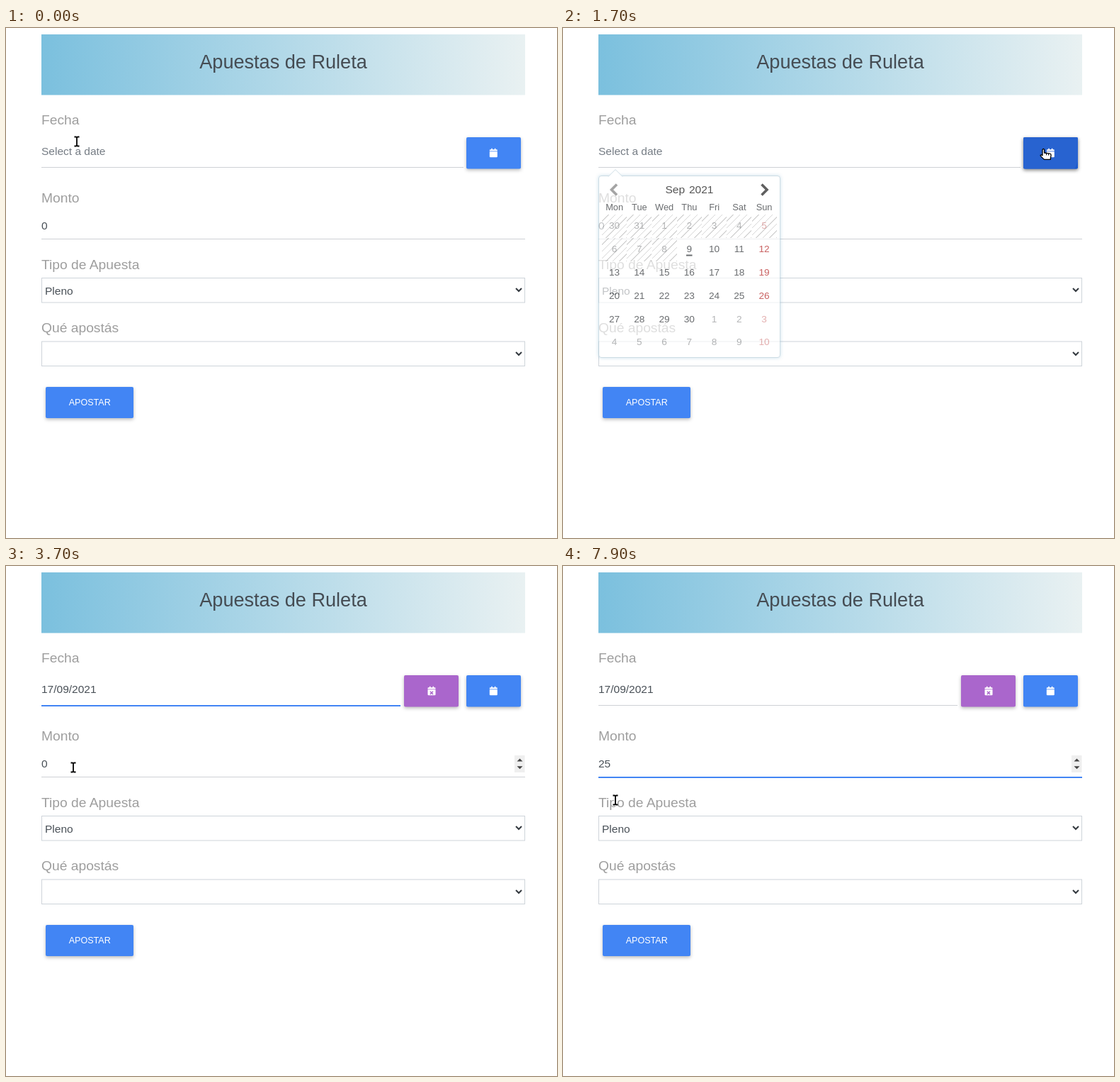
An HTML page that plays this animation: 778x719 px, repeating every 8000 ms.

```html
<!DOCTYPE html>
<html lang="es">
<head>
<meta charset="utf-8">
<title>Apuestas de Ruleta</title>
<style>
  html, body { margin: 0; width: 100%; height: 100%; overflow: hidden; background: #fff; }
  body { position: relative; font-family: "Liberation Sans", Arial, sans-serif; }
  svg { position: absolute; left: 0; top: 0; width: 778px; height: 719px; }
  .title { font-size: 27.1px; fill: #454c53; text-anchor: middle; }
  .label { font-size: 19.25px; fill: #9e9e9e; }
  .field { font-size: 15.5px; fill: #495057; }
  .hint { fill: #757c84; }
  .button { filter: drop-shadow(0 2px 2.5px rgba(0,0,0,.27)); }
  .chevron { fill: none; stroke: #343a40; stroke-width: 2; }
  .option { font: bold 13.2px "Noto Sans", sans-serif; fill: #333; }
  #list rect { filter: drop-shadow(0 1px 2px rgba(0,0,0,.35)); }
  #calendar { position: absolute; left: 50px; top: 208px; width: 255px; height: 255px;
    background: #fff; border: 1px solid #b4ccd8; border-radius: 4px;
    box-shadow: 0 0 5px rgba(100,165,200,.5); color: #212529; }
  #calendar svg { left: -51px; top: -209px; }
  #calendar div { position: absolute; width: 35.2px; height: 32.8px;
    font-size: 13.6px; line-height: 32.8px; text-align: center; }
  #calendar .weekday { font-size: 12.8px; }
  #calendar .sunday { color: #b01515; }
  #calendar .past { background: repeating-linear-gradient(-45deg, #c4c4c4 0 1px, transparent 1px 6.8px); }
  #calendar .past span, #calendar .other span { opacity: .5; }
  #calendar .hover { background: #ddd; }
  .month { font-size: 15.5px; fill: #000; }
  .arrow { fill: none; stroke-width: 3.6; }
</style>
</head>
<body>
<svg id="page">
  <defs>
    <linearGradient id="sky"><stop stop-color="#7bc0de"/><stop offset="1" stop-color="#e9f1f2"/></linearGradient>
    <clipPath id="buttonClip"><rect x="650" y="154" width="77" height="44.5" rx="2"/></clipPath>
    <g id="icon" fill="#fff">
      <path d="M-5.5-1.7h11v6.9q0 1.1-1.1 1.1h-8.8q-1.1 0-1.1-1.1zM-5.5-2.5v-1.2q0-1.1 1.1-1.1h8.8q1.1 0 1.1 1.1v1.2z"/>
      <path d="M-3.1-6.3h1.6v2h-1.6zM1.5-6.3h1.6v2h-1.6z"/>
    </g>
  </defs>
  <rect x="50" y="9" width="683" height="85.5" fill="url(#sky)"/>
  <text class="title" x="391.5" y="57">Apuestas de Ruleta</text>
  <text class="label" x="50" y="136">Fecha</text>
  <text class="label" x="50" y="246">Monto</text>
  <text class="label" x="50" y="339.5">Tipo de Apuesta</text>
  <text class="label" x="50" y="429">Qué apostás</text>

  <text id="date" class="field" x="50" y="178.5"></text>
  <rect id="dateLine" x="50" y="196" height="1" fill="#ced1d5"/>
  <rect id="dateFocus" x="50" y="196" height="2" fill="#4285f4"/>
  <text id="amount" class="field" x="50" y="283.5"></text>
  <rect x="50" y="297" width="683" height="1" fill="#ced1d5"/>
  <rect id="amountFocus" x="50" y="297" width="683" height="2" fill="#4285f4"/>
  <g id="spinner">
    <rect x="718" y="267" width="14.5" height="24" fill="#efefef"/>
    <path d="M721.5 275.5l4-4 4 4zM721.5 282.3l4 4 4-4z" fill="#444"/>
  </g>
  <rect id="caret" width="1" height="16" fill="#343a40"/>

  <g fill="#fff" stroke="#ced4da">
    <rect x="50.5" y="352.5" width="682" height="34.5"/>
    <rect x="50.5" y="442" width="682" height="34.5"/>
  </g>
  <text class="field" x="55" y="376">Pleno</text>
  <path class="chevron" d="M720 367l4 4 4-4M720 457l4 4 4-4"/>

  <g id="clear">
    <rect class="button" x="562" y="154" width="77" height="44.5" rx="2" fill="#aa66cc"/>
    <use href="#icon" x="601" y="176"/>
    <path d="M598.8 176.7l4.2 4.2m0-4.2l-4.2 4.2" stroke="#aa66cc" stroke-width="1.5"/>
  </g>
  <rect class="button" x="650" y="154" width="77" height="44.5" rx="2" fill="#4285f4"/>
  <rect id="pressed" class="button" x="650" y="154" width="77" height="44.5" rx="2" fill="#1c5bcd"/>
  <circle id="ripple" cx="679" cy="172" fill="#fff" clip-path="url(#buttonClip)"/>
  <use href="#icon" x="688.3" y="176"/>
  <rect class="button" x="56" y="506" width="124" height="44" rx="2" fill="#4285f4"/>
  <text x="118.2" y="532" font-size="12.57" fill="#fff" text-anchor="middle">APOSTAR</text>

  <g id="list"><rect x="51" y="200" width="182.5" height="184.5" rx="2" fill="#fff"/></g>
</svg>

<div id="calendar">
  <svg>
    <path d="M64 209.5l10-10 10 10" fill="#fff" stroke="#b4ccd8"/>
    <text class="month" x="144.5" y="233">Sep</text>
    <text class="month" x="178" y="233">2021</text>
    <path class="arrow" d="M76 220.5l-7.5 7.5 7.5 7.5" stroke="#777"/>
    <path class="arrow" d="M280.5 220.5l7.5 7.5-7.5 7.5" stroke="#111"/>
    <path d="M174 320.5h8.5" stroke="#212529" stroke-width="2"/>
  </svg>
</div>

<svg id="pointer" stroke-linejoin="round">
  <g id="beam" fill="none">
    <path id="beamShape" d="M-3.2-6.5h1.7Q0-6.5 0-5V5Q0 6.5-1.5 6.5h-1.7M3.2-6.5H1.5Q0-6.5 0-5M3.2 6.5H1.5Q0 6.5 0 5" stroke="#fff" stroke-width="3.6"/>
    <use href="#beamShape"/>
    <path d="M-3.5-6.5h2Q0-6.5 0-5V5Q0 6.5-1.5 6.5h-2M3.5-6.5h-2Q0-6.5 0-5M3.5 6.5h-2Q0 6.5 0 5" stroke="#000" stroke-width="1.8"/>
  </g>
  <g id="hand" fill="#fff" stroke="#000" stroke-width="1.3">
    <path d="M-1 9.8V1.8a1.3 1.3 0 0 1 2.6 0v4.2l8 1.2q1.7.4 1.5 2l-.9 6.2H1.4L-3.7 10.4q-.5-1.7 1-1.5z"/>
    <path d="M4.5 6.8v2.5M7.5 7.2v2.3" stroke-width="1"/>
  </g>
  <path id="arrow" d="M0 0V16.3l3.9-3.6 2.7 5.9 2.6-1.1-2.7-5.8h5z" fill="#fff" stroke="#111" stroke-width="1.4"/>
</svg>

<script>
const LOOP = 8000, STEP = 100;
const $ = id => document.getElementById(id);
const set = (id, attributes) => {
  for (const key in attributes) $(id).setAttribute(key, attributes[key]);
};
const between = (t, from, to) => t >= from && t < to;

// Linear interpolation through [time, value] pairs.
function track(t, ...keys) {
  const next = keys.findIndex(key => key[0] > t);
  if (next < 0) return keys[keys.length - 1][1];
  if (next === 0) return keys[0][1];
  const [t0, a] = keys[next - 1], [t1, b] = keys[next];
  return a + (b - a) * (t - t0) / (t1 - t0);
}

["01/08/2020", "26/09/2020", "08/08/2020", "02/08/2020", "24/09/2021"].forEach((text, i) =>
  $("list").insertAdjacentHTML("beforeend",
    `<text class="option" x="63.5" y="${229 + 34 * i}">${text}</text>`));

function addCell(text, column, top, classes) {
  const cell = document.createElement("div");
  cell.className = classes;
  cell.style.left = 4 + 35.25 * column + "px";
  cell.style.top = top + "px";
  cell.innerHTML = `<span>${text}</span>`;
  $("calendar").append(cell);
  return cell;
}

["Mon", "Tue", "Wed", "Thu", "Fri", "Sat", "Sun"].forEach((name, i) => addCell(name, i, 27.6, "weekday"));
const dayCells = {};
for (let i = 0; i < 42; i++) {
  const date = new Date(2021, 7, 30 + i), column = i % 7;
  const classes = [column === 6 && "sunday", i < 10 && "past", date.getMonth() !== 8 && "other"];
  const cell = addCell(date.getDate(), column, 54.3 + 32.8 * Math.floor(i / 7), classes.filter(Boolean).join(" "));
  if (date.getMonth() === 8) dayCells[date.getDate()] = cell;
}

// time, x, y
const route = [
  [500, 100, 160], [600, 240, 170], [700, 467, 187], [900, 467, 187], [1000, 560, 184],
  [1200, 678, 170], [1700, 678, 170], [1800, 650, 182], [2100, 262, 312], [2200, 215, 338],
  [2300, 205, 344], [2500, 205, 344], [2600, 203, 345.5], [3300, 203, 345.5],
  [3700, 95, 284], [4000, 79, 281.5], [7700, 79, 281.5], [7900, 74, 330]
];
const routeX = route.map(([t, x]) => [t, x]), routeY = route.map(([t, , y]) => [t, y]);

function caretPosition(t) {
  if (between(t, 300, 900)) return [50, 165];
  if (between(t, 2900, 3500)) return [127, 165];
  if (between(t, 4100, 4800) || between(t, 5400, 5500)) return [58, 270];
  if (between(t, 5500, 6000) || between(t, 6600, 7000)) return [50, 270];
  if (between(t, 7000, 7300)) return [58, 270];
  if (between(t, 7300, 7900)) return [67, 270];
  return null;
}

function setText(id, value, hint) {
  $(id).textContent = value || hint;
  $(id).classList.toggle("hint", !value);
}

function render(t) {
  const chosen = t >= 2900;
  setText("date", chosen ? "17/09/2021" : "", "Select a date");
  setText("amount", t < 5500 ? "0" : t < 7000 ? "" : t < 7300 ? "2" : "25", "Monto en $");

  const lineWidth = chosen ? 507 : 596;
  set("dateLine", { width: lineWidth });
  set("dateFocus", {
    width: lineWidth, height: between(t, 1500, 1700) ? 1 : 2,
    opacity: track(t, [200, 0], [400, 1], [1400, 1], [1500, .45], [1700, 0], [3000, 0], [3200, 1], [4000, 1], [4300, 0])
  });
  set("amountFocus", { opacity: track(t, [4000, 0], [4300, 1]) });
  set("spinner", { opacity: t >= 3700 ? 1 : 0 });
  set("clear", { opacity: chosen ? 1 : 0 });

  const caret = caretPosition(t);
  set("caret", caret ? { x: caret[0], y: caret[1], opacity: 1 } : { opacity: 0 });

  set("list", { opacity: track(t, [200, 0], [400, 1], [1400, 1], [1500, .6], [1600, .15], [1700, 0]) });
  set("pressed", { opacity: track(t, [1300, 0], [1400, .6], [1500, 1], [1700, 1], [2000, 0]) });
  set("ripple", {
    r: track(t, [1400, 8], [1500, 22], [1800, 65]),
    opacity: track(t, [1300, 0], [1400, .1], [1500, .1], [1900, 0])
  });

  $("calendar").style.opacity = track(t, [1500, 0], [1800, 1], [2800, 1], [3000, 0]);
  dayCells[11].classList.toggle("hover", between(t, 2200, 2300));
  dayCells[17].classList.toggle("hover", between(t, 2300, 3000));

  const shape = between(t, 1200, 1800) || between(t, 2200, 3000) ? "hand"
    : between(t, 1100, 2200) || between(t, 3000, 3700) ? "arrow" : "beam";
  const place = `translate(${track(t, ...routeX)} ${track(t, ...routeY)})`;
  for (const id of ["beam", "hand", "arrow"])
    set(id, { transform: place, visibility: id === shape ? "visible" : "hidden" });
}

const start = performance.now();
function tick() {
  const t = (performance.now() - start) % LOOP;
  render(Math.floor(t / STEP) * STEP);
  requestAnimationFrame(tick);
}
tick();
</script>
</body>
</html>
```
